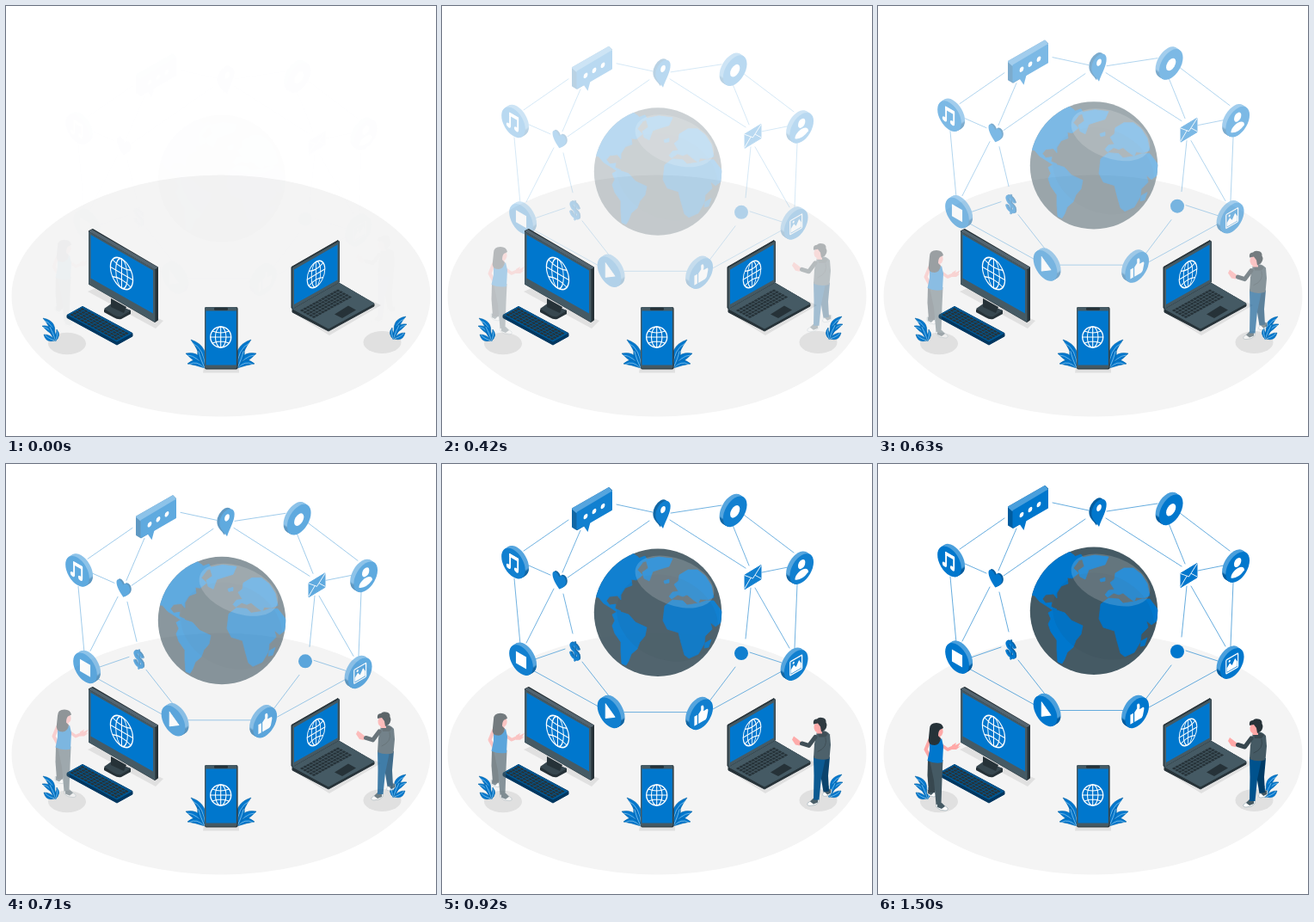
These frames come from a looping animation (500 by 500 pixels, 1.54 s). An HTML page:

```html
<!DOCTYPE html>
<html lang="en">
<head>
<meta charset="utf-8">
<title>Connected devices</title>
<style>
html, body { margin: 0; width: 100%; height: 100%; overflow: hidden; background: #fff; }
svg { display: block; width: 100vw; height: 100vh; }
</style>
</head>
<body>
<svg id="stage" viewBox="0 0 500 500"></svg>
<script>
const BLUE = '#0077cd', DEEP = '#005c9f', LIGHT = '#4a9fdc', SLATE = '#455a64',
      MID = '#37474f', DARK = '#263238', SHADE = '#e0e0e0', SKIN = '#ffa8a7', WHITE = '#fff';

// Shape helpers
const path = (d, fill, extra = '') => `<path d="${d}" fill="${fill}" ${extra}/>`;
const poly = (pts, fill, extra = '') => `<polygon points="${pts}" fill="${fill}" ${extra}/>`;
const oval = (x, y, rx, ry, fill, extra = '') =>
  `<ellipse cx="${x}" cy="${y}" rx="${rx}" ry="${ry}" fill="${fill}" ${extra}/>`;
const line = (d, color, w, extra = '') =>
  path(d, 'none', `stroke="${color}" stroke-width="${w}" stroke-linecap="round" stroke-linejoin="round" ${extra}`);
const group = (transform, body) => `<g transform="${transform}">${body}</g>`;
const plane = (x, y, side, body, sx = .866, sk = .5) =>
  group(`matrix(${sx} ${side * sk} 0 1 ${x} ${y})`, body);
const round = (fill, w = 1.5) => `stroke="${fill}" stroke-width="${w}" stroke-linejoin="round"`;

// Side 1 faces left, side -1 faces right
function coin(x, y, side, glyph) {
  let s = '';
  for (let i = 5; i > 0; i--)
    s += plane(x + side * i * .85, y - i * .55, side, oval(0, 0, 16, 16, 'url(#edge)'));
  return s + plane(x, y, side, oval(0, 0, 16, 16, BLUE) + glyph);
}

function globeIcon(r, w) {
  const a = r * .8, b = r * .58;
  return line(`M0 ${-r}V${r}M${-r} 0H${r}M${-a} ${-b}Q0 ${-b * .45} ${a} ${-b}M${-a} ${b}Q0 ${b * .45} ${a} ${b}`, WHITE, w)
    + oval(0, 0, r, r, 'none', `stroke="${WHITE}" stroke-width="${w * 1.2}"`)
    + oval(0, 0, r * .52, r, 'none', `stroke="${WHITE}" stroke-width="${w}"`);
}

// Curved leaf from base to tip; b bends it sideways, w is its width
function leaf(x0, y0, x1, y1, b, w) {
  const dx = x1 - x0, dy = y1 - y0, len = Math.hypot(dx, dy);
  const nx = -dy / len, ny = dx / len, mx = x0 + dx * .55, my = y0 + dy * .55;
  const at = k => `${(mx + nx * k).toFixed(1)} ${(my + ny * k).toFixed(1)}`;
  return path(`M${x0} ${y0}Q${at(b + w)} ${x1} ${y1}Q${at(b - w)} ${x0} ${y0}Z`, BLUE, `stroke="${DEEP}" stroke-width=".5"`)
    + line(`M${x0} ${y0}Q${at(b)} ${x0 + dx * .88} ${y0 + dy * .88}`, '#b8dcf4', .6);
}

function smallPlant() {
  return leaf(13, 25, 1, 2, 9, 6) + leaf(13, 22, 0, 11, 4, 5) + leaf(15, 28, 2, 21, -2, 6)
    + leaf(16, 29, 8, 10, 1, 5) + leaf(15, 29, 17, 15, 3, 4);
}

function bigPlant() {
  return leaf(22, 34, 6, 1, 10, 7) + leaf(22, 34, 0, 17, 6, 8)
    + leaf(22, 34, 2, 29, 7, 6) + leaf(22, 34, 14, 12, -1, 5);
}

const links = '203 45 245 54 266 55 325 46 265 63 353 119 241 64 146 130 161 75 140 124 ' +
  '147 63 95 99 101 116 126 127 84 131 91 208 130 143 98 206 141 149 152 195 ' +
  '143 213 108 225 163 228 196 270 106 238 182 280 212 286.5 286 286.5 310 275 341 234 ' +
  '315 283 395 239 358 217 395 229 353 201 359 142 364 142 404 212 372 124 402 118 ' +
  '338 69 357 116 351 57 409 101 413 138 410 212';

function linkLines() {
  const n = links.split(' ');
  let d = '';
  for (let i = 0; i < n.length; i += 4) d += `M${n[i]} ${n[i + 1]}L${n[i + 2]} ${n[i + 3]}`;
  return line(d, '#3f97d6', .8);
}

function globe() {
  const land =
    // North America
    'M176 152L185 132L201 112L222 102L228 106L233 113L227 121L233 127L226 133L220 132L221 139L213 142L208 150L208 156L204 151L195 152L191 157L195 162L202 161L201 166L208 169L205 171L196 165L188 160L182 153Z' +
    // South America
    'M198 173L205 169L217 173L225 182L238 188L236 198L230 205L227 213L220 219L217 227L214 232L209 230L208 216L208 205L201 195L198 186L201 180Z' +
    // Greenland and islands
    'M237 109L252 106L268 108L264 117L254 120L245 123L241 134L235 131L233 124L240 119ZM228 108L236 105L239 110L231 113ZM258 134L264 132L264 136L259 137Z' +
    // Europe
    'M270 138L275 134L276 127L286 121L297 121L306 128L313 139L316 153L309 156L300 155L298 160L291 155L285 150L280 152L274 150L267 155L264 152L268 147L275 146Z' +
    // Africa and Arabia
    'M259 163L268 156L280 157L285 162L298 160L307 157L316 157L326 170L326 181L318 187L312 182L314 190L306 198L305 207L298 219L287 224L282 220L278 206L275 194L262 190L257 180Z' +
    'M306 206L313 202L310 211L305 212Z';
  return oval(251, 170.7, 74.2, 74.2, SLATE)
    + `<g clip-path="url(#ball)">${path(land, BLUE, round(BLUE, .8))}
      ${oval(262, 177, 61, 48, DARK, 'opacity=".07" transform="rotate(25 262 177)"')}
      ${oval(270.5, 135, 48, 27, WHITE, 'opacity=".17" transform="rotate(21 270.5 135)"')}</g>`;
}

function bubble() {
  const tail = 'M164 69L169.5 77L173 64Z';
  return poly('152,50 194,26 197,29 197,50 157,74 152,71', DEEP, round(DEEP, 2))
    + poly('152,50 194,26 197,30 156.5,54', LIGHT, round(LIGHT, 2))
    + path(tail, BLUE)
    + poly('157.5,54.5 197,31 197,51 171,66 157.5,73', BLUE, round(BLUE, 2))
    + [[167, 59], [177, 53], [187, 47]].map(([x, y]) => plane(x, y, -1, oval(0, 0, 2.8, 2.8, WHITE))).join('');
}

function pin() {
  const drop = 'M0 16C-4 8-10 3-10-5A10 10 0 0 1 10-5C10 3 4 8 0 16Z';
  return plane(254, 55.5, -1, path(drop, DEEP))
    + plane(257, 57, -1, path(drop, BLUE) + oval(0, -6, 3.3, 3.8, WHITE));
}

function heart() {
  const d = 'M0 9C-5 5-9 1-9-4C-9-10-2-10 0-5C2-10 9-10 9-4C9 1 5 5 0 9Z';
  return plane(138, 133.5, 1, path(d, DEEP)) + plane(136.3, 134.5, 1, path(d, BLUE));
}

function envelope() {
  return poly('352,127 371,115.5 371,132 352,143.5', BLUE, round(BLUE, 1))
    + line('M352 127.5L361.5 131L371 116M352 142.5L359 130.5M371 131L364.5 127.5', WHITE, .9);
}

function dollar() {
  const t = fill => `<text text-anchor="middle" y="9.5" font-family="'Liberation Sans',Arial,sans-serif" font-weight="700" font-size="27" fill="${fill}" stroke="${fill}" stroke-width=".6">$</text>`;
  return plane(155.2, 215, 1, t(DEEP), .8) + plane(154, 215.7, 1, t(BLUE), .8);
}

const note = line('M-4.5 6V-8L6-8V5', WHITE, 2.2) + poly('-5.5,-9 7,-9 7,-5 -5.5,-5', WHITE)
  + oval(-6.5, 6.5, 3, 2.6, WHITE) + oval(4, 6, 3, 2.6, WHITE);
const dot = oval(0, 0, 6.5, 6.5, WHITE);
const tile = `<rect x="-7" y="-7" width="14" height="14" fill="${WHITE}"/>`;
const play = poly('-5,-8 7.5,1 -5,8.5', WHITE, round(WHITE, 1));
const thumb = `<rect x="-9" y="-2" width="4" height="11" fill="${WHITE}"/>`
  + path('M-3.5-2L0-5V-9.5Q3.5-11 3.8-6L3.3-2.5H8Q10-2 9.3 1L7.8 7Q7 9 5 9H-3.5Z', WHITE);
const photo = `<rect x="-8" y="-8" width="16" height="16" rx="1" fill="none" stroke="${WHITE}" stroke-width="1.4"/>`
  + poly('-7,6.5 -7,2 -3,-2 0,2 4,-4 7,1 7,6.5', WHITE) + oval(-3.5, -4.5, 1.3, 1.3, WHITE);
const person = oval(0, -5.5, 4.8, 5, WHITE) + path('M-9 8C-9-1 9-1 9 8Q0 14-9 8Z', WHITE);

function network() {
  return linkLines() + globe() + bubble() + pin() + heart() + envelope() + dollar()
    + oval(348, 218, 8, 8, BLUE)
    + coin(83, 113.5, 1, note) + coin(92, 226, 1, tile) + coin(194.5, 287.3, 1, play)
    + coin(340.7, 53.3, -1, dot) + coin(418.2, 120, -1, person)
    + coin(411.7, 232, -1, photo) + coin(301.2, 289.3, -1, thumb);
}

function monitor() {
  return poly('95,332 104,328 183,366 174,375', SHADE)
    + path('M114 353L123 347L145 354V358L134 364Q130 365 125 362L114 356Z', DARK)
    + path('M114 352L124 345L145 354L134 361Q130 362 125 359Z', MID)
    + poly('122,340 140,350 137,357 122,350', DARK)
    + poly('97,262 101,260 176,304 176,365 173,367 97,323', DARK, round(DARK, 2))
    + poly('97,262 100,260.5 176,304 173,306', '#546570', round('#546570', 1))
    + poly('96.5,263 173,307 173,367 96.5,323.5', SLATE, round(SLATE, 1))
    + poly('98.5,266 171,307.5 171,357.5 98.5,316.5', BLUE)
    + plane(134.5, 311, 1, globeIcon(17, 1.3), .77, .45);
}

// Points on a tilted board: u and v run along its two sides
function grid(x, y, ax, ay, bx, by, cols, rows, fill) {
  let s = '';
  for (let r = 0; r < rows; r++)
    for (let c = 0; c < cols; c++) {
      const at = (u, v) => `${(x + ax * u / cols + bx * v / rows).toFixed(1)},${(y + ay * u / cols + by * v / rows).toFixed(1)} `;
      s += at(c + .1, r + .12) + '|' + at(c + .9, r + .12) + '|' + at(c + .9, r + .88) + '|' + at(c + .1, r + .88) + ';';
    }
  const d = s.split(';').filter(Boolean).map(q => 'M' + q.split('|').join('L') + 'Z').join('');
  return path(d, fill);
}

function keyboard() {
  return poly('71,359.5 89,349.5 147,380.5 147,384 129,394 71,362.5', '#00365f', round('#00365f', 1))
    + poly('71,359 89,349 147,380.5 129,390.5', '#005691')
    + grid(73.5, 359, 55, 30, 15, -8.3, 14, 5, DARK);
}

function laptop() {
  return poly('334,357 390,325 436,348 376,383', SHADE)
    + poly('333,352 387,322 428,346 428,349 375,378 333,356', DARK, round(DARK, 1))
    + poly('333,352 387,322 428,346 375,375', SLATE, round(SLATE, 1))
    + grid(341, 354, 45, -25, 17, 9.5, 13, 5, DARK)
    + poly('382,358.5 398,348.5 407,353.5 391,363', DARK)
    + poly('332,303.5 386,272.5 387.5,274 387.5,321 333,352 332,351', DARK, round(DARK, 1))
    + poly('333.5,304.5 387,274 387,321 333.5,351.5', SLATE, round(SLATE, 1))
    + poly('335,306.5 385.5,277.5 385.5,318.5 335,347', BLUE)
    + plane(360.5, 312, -1, globeIcon(14.5, 1.2), .71, .42);
}

function phone() {
  return poly('230,421 271,421 271,426.5 229,426.5', SHADE)
    + `<rect x="231" y="350" width="38.6" height="72.5" rx="2" fill="${DARK}"/>
       <rect x="231" y="350" width="37.5" height="71.5" rx="2" fill="${SLATE}"/>
       <rect x="232.5" y="354.5" width="35.3" height="63" fill="${BLUE}"/>
       <rect x="242" y="350.8" width="16" height="3" rx="1.2" fill="${DARK}"/>`
    + group('translate(249.7 385)', globeIcon(12, 1.1));
}

function shoe(x, y, d) {
  return group(`translate(${x} ${y}) scale(${d} 1)`,
    path('M0 0L5-1L13 5Q14 8 10 8L4 7L0 4Z', WHITE, 'stroke="#90a4ae" stroke-width=".6"')
    + path('M1 0L6-1L10 3L6 6L1 4Z', SLATE));
}

function woman() {
  return shoe(57, 379, .8)
    + path('M58 344L68 346L66 382L59 382L57.5 362Z', MID)
    + shoe(68, 395, 1)
    + path('M60 344H75.5L74.5 366L73.5 395L67.5 396L65 368Z', SLATE)
    + line('M74 327L81 332L88 329', SKIN, 3.6)
    + path('M86 327L91 324L90 327L96 324L93 329L96 328L91 332L86 332Z', SKIN)
    + line('M60 321L55.5 332L61 342', SKIN, 4)
    + path('M66 314H72L73 321H64Z', SKIN)
    + path('M60 319L64 317L71 322L74 319L76 328L75 347Q66 349 57.5 345L60 333Z', BLUE)
    + oval(71, 311, 4.6, 6, SKIN)
    + path('M60 308Q60 301 68 301Q75 301 76 307L72 309Q70 311 70 316L73 319Q72 326 66 327Q57 327 59 318Z', DARK);
}

function man() {
  return shoe(453, 380, -.8)
    + path('M440 342L451 342L449 364L450 382L443.5 383L440 362Z', '#003b66')
    + shoe(438, 391, -1)
    + path('M432 341L446 343L441 367L438.5 392L432 392L432.5 364Z', '#00528d')
    + path('M416 329L411 328L407 322L409 318L413 321L418 325Z', SKIN)
    + path('M436 313Q445 309 451 316L452 328L450.5 344Q441 347 432 343L433 327Z', SLATE)
    + line('M434 319L426.5 329L418.5 326.5', MID, 5)
    + line('M446 320Q449 331 437 336', MID, 1)
    + path('M437 314Q444 311 449 315L446 319L438 319Z', MID)
    + path('M435 309H442V315H436Z', SKIN)
    + oval(437, 307.5, 4.5, 6, SKIN)
    + path('M432 304Q431 298 436 298Q438 295.5 442 296.5Q447 297 446.5 302Q449 306 445 311L441 313L440 307L437 303Z', DARK);
}

document.getElementById('stage').innerHTML = `
  <defs>
    <linearGradient id="edge" x1="0" y1="0" x2="0" y2="1">
      <stop offset=".5" stop-color="${LIGHT}"/><stop offset=".58" stop-color="${DEEP}"/>
    </linearGradient>
    <clipPath id="ball"><circle cx="251" cy="170.7" r="74.2"/></clipPath>
  </defs>`
  + oval(250, 337, 243.5, 140.5, '#f4f4f4')
  + oval(71, 392.5, 22, 12.7, SHADE) + oval(437.5, 391, 22, 13, SHADE)
  + `<g id="net">${network()}</g>`
  + monitor() + keyboard() + laptop()
  + group('translate(42 361)', smallPlant()) + group('translate(466 359) scale(-1 1)', smallPlant())
  + group('translate(209 387)', bigPlant()) + group('translate(291 387) scale(-1 1)', bigPlant())
  + phone()
  + `<g id="woman">${woman()}</g><g id="man">${man()}</g>`;

// Timing
const LOOP = 1540, STEP = 1000 / 24;
const clamp = v => Math.max(0, Math.min(1, v));

function bezier(x1, y1, x2, y2) {
  const f = (a, b, s) => 3 * (1 - s) * (1 - s) * s * a + 3 * (1 - s) * s * s * b + s * s * s;
  return x => {
    if (x >= 1) return 1;
    let lo = 0, hi = 1;
    for (let i = 0; i < 30; i++) {
      const m = (lo + hi) / 2;
      if (f(x1, x2, m) < x) lo = m; else hi = m;
    }
    return f(y1, y2, lo);
  };
}

const easeIn = bezier(.42, 0, 1, 1), spring = bezier(.36, -.01, .5, 1.38);
const [net, her, him] = ['net', 'woman', 'man'].map(id => document.getElementById(id));

function slide(el, p, from) {
  el.setAttribute('transform', `translate(0 ${(from * (1 - p)).toFixed(3)})`);
  el.setAttribute('opacity', clamp(p).toFixed(4));
}

// The motion advances at 24 steps a second
function draw(ms) {
  const t = (Math.floor((ms % LOOP + 3.4) / STEP) + 1) * STEP;
  slide(net, easeIn(clamp(t / 1000)), 30);
  slide(her, clamp(t / LOOP), -30);
  slide(him, spring(clamp(t / 1520)), -30);
}

const start = performance.now();
function tick() {
  draw(performance.now() - start);
  requestAnimationFrame(tick);
}
tick();
</script>
</body>
</html>
```
